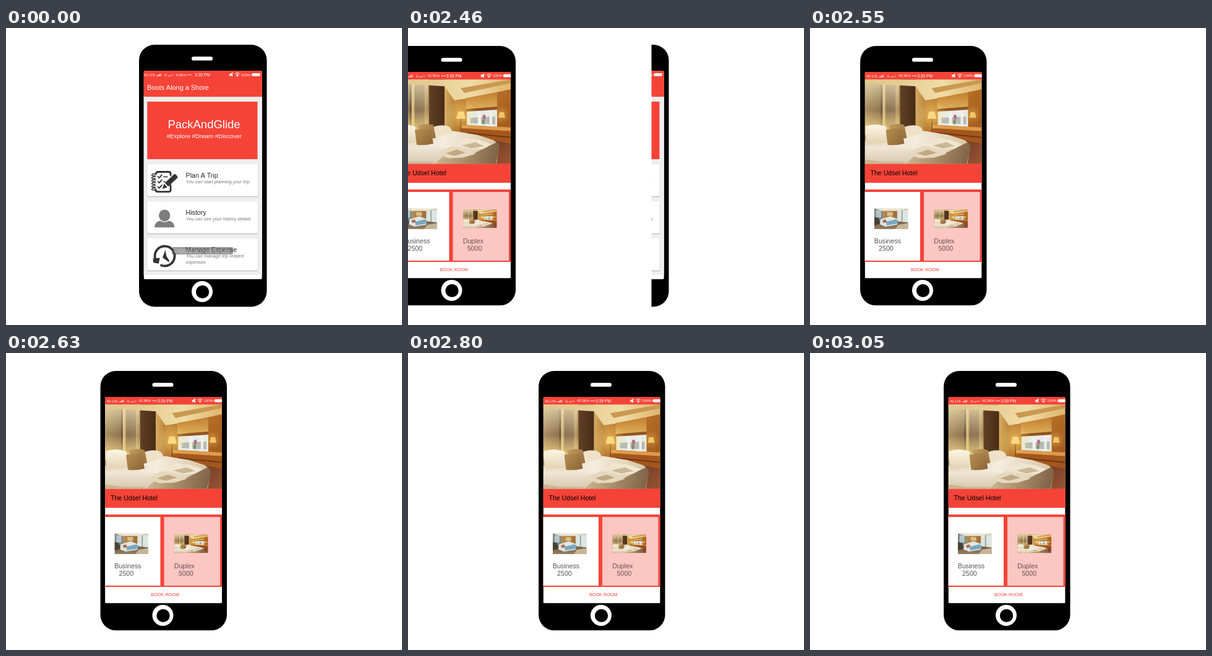
Animation, 640 px wide and 480 px high, one loop 5.05 s. Source, as an HTML page with a canvas:

```html
<!DOCTYPE html>
<html lang="en">
<head>
<meta charset="utf-8">
<title>Travel app</title>
<style>
html, body { margin: 0; width: 100%; height: 100%; overflow: hidden; background: #fff; }
canvas { display: block; width: 640px; height: 480px; }
</style>
</head>
<body>
<canvas id="stage" width="640" height="480"></canvas>
<script>
const ctx = document.getElementById('stage').getContext('2d');
const LOOP = 5050, SLIDE_START = 2380, SLIDE_STEPS = 13, SLIDE_END = 2920;
const RED = '#f64338', DARK = '#333';

function box(color, x, y, w, h, r = 0) {
  ctx.fillStyle = color;
  ctx.beginPath();
  ctx.roundRect(x, y, w, h, r);
  ctx.fill();
}

function disc(color, x, y, rx, ry = rx) {
  ctx.fillStyle = color;
  ctx.beginPath();
  ctx.ellipse(x, y, rx, ry, 0, 0, 7);
  ctx.fill();
}

function shape(color, d) {
  ctx.fillStyle = color;
  ctx.fill(new Path2D(d));
}

function line(color, width, d) {
  ctx.strokeStyle = color;
  ctx.lineWidth = width;
  ctx.stroke(new Path2D(d));
}

function text(str, x, y, size, color, align = 'left', style = '') {
  ctx.font = `${style} ${size}px "Liberation Sans", Arial, sans-serif`;
  ctx.textAlign = align;
  ctx.fillStyle = color;
  ctx.fillText(str, x, y);
}

function fade(x0, y0, x1, y1, ...colors) {
  const g = ctx.createLinearGradient(x0, y0, x1, y1);
  colors.forEach((c, i) => g.addColorStop(i / (colors.length - 1), c));
  return g;
}

function glow(x, y, r, rgb, alpha) {
  const g = ctx.createRadialGradient(x, y, 0, x, y, r);
  g.addColorStop(0, `rgba(${rgb},${alpha})`);
  g.addColorStop(1, `rgba(${rgb},0)`);
  box(g, x - r, y - r, 2 * r, 2 * r);
}

// Runs draw() in a w0 x h0 space mapped onto the given rectangle.
function framed(x, y, w, h, w0, h0, draw) {
  ctx.save();
  ctx.translate(x, y);
  ctx.scale(w / w0, h / h0);
  ctx.beginPath();
  ctx.rect(0, 0, w0, h0);
  ctx.clip();
  draw();
  ctx.restore();
}

function phone(x, y, w, h, screen, homeY, drawScreen) {
  box('#000', x, y, w, h, 25);
  box('#fff', 300, y + 19.3, 34, 6.2, 3.1);
  disc('#fff', 317, homeY, 17);
  disc('#000', 317.6, homeY + 0.5, 10.6);
  ctx.save();
  ctx.beginPath();
  ctx.roundRect(...screen, 2);
  ctx.clip();
  box('#fff', ...screen);
  drawScreen();
  ctx.restore();
}

function signal(x, y, solid, unit) {
  for (let i = 0; i < 5; i++) {
    const h = (i + 1.4) * unit;
    box(i < solid ? '#fff' : 'rgba(255,255,255,.35)', x + i * 1.9, y - h, 1.1, h);
  }
}

function statusBar(dx, dy, speed, dotsX, clock) {
  ctx.save();
  ctx.translate(dx, dy);
  text('4G LTE', 222.8, 78, 5.4, '#fff');
  signal(243, 78, 4, 0.9);
  text('G', 256.2, 78, 5.4, '#fff');
  signal(262, 78, 2, 0.75);
  text(speed, 274.8, 77.6, 5.9, '#fff');
  for (let i = 0; i < 3; i++) disc('#fff', dotsX + i * 2.5, 75.6, 0.8);
  text(clock, 305, 77.8, 6.7, '#fff');
  shape('#fff', 'M361 74H363L366 71.8V78.6L363 76.8H361Z');
  line('#fff', 0.8, 'M361.6 78.4L367 72');
  line('#fff', 1, 'M369.8 74.3Q374 70.8 378.2 74.3M371.4 76Q374 73.8 376.6 76');
  disc('#fff', 374, 77.3, 1.2);
  text('100%', 380, 77.6, 5.9, '#fff');
  box('#fff', 397.6, 73, 13, 4.8, 1);
  box('#fff', 396.6, 74.5, 1.2, 1.8);
  ctx.restore();
}

function notebookIcon() {
  ctx.lineJoin = ctx.lineCap = 'round';
  line(DARK, 2.8, 'M242.5 236Q242.5 232.5 246 232.5H263Q266 232.5 266 235.5V238M266 254V262Q266 264.7 263 264.7H245.5Q242 264.7 242 261.5');
  for (let i = 0; i < 6; i++) {
    const y = 237 + i * 4.6;
    line(DARK, 1.5, `M241.8 ${y - 1}Q236 ${y - 2} 235.5 ${y + 1}Q237 ${y + 2.4} 241 ${y + 1.6}`);
  }
  for (const y of [240, 248, 256.5]) line(DARK, 1.8, `M245.5 ${y}L247.6 ${y + 2.4}L251.8 ${y - 2.6}`);
  line(DARK, 1.3, 'M254.5 240.5H261M254.5 248.5H257');
  shape(DARK, 'M271.5 236.5Q273 235.4 274.4 236.8L277 239.8Q278 241.2 276.8 242.4L262.2 256.3L256.8 250.2ZM255.6 251.6L260.8 257.5L252.8 259.9Z');
  ctx.lineJoin = 'miter';
  ctx.lineCap = 'butt';
}

function personIcon() {
  disc('#7d7d7d', 256.2, 303, 9.2, 9.4);
  shape('#7d7d7d', 'M240 322.3Q240 313.5 249 311.5Q256 316 263.5 311.5Q272.3 313.5 272.3 322.3Z');
}

function clockIcon() {
  line(DARK, 3.8, 'M241.2 373A16 16 0 1 1 249.5 382.9');
  shape(DARK, 'M237.4 372.5L248.6 371.5L246.8 380.8L238.2 379.2Z');
  shape(DARK, 'M257.6 358.5L259.2 368.5L264.4 376.8L262.8 378L253 371Z');
}

function card(y, title, notes, icon) {
  box('#dedede', 227.5, y + 0.7, 180, 52.4, 1.5);
  box('#c4c4c4', 228.2, y + 1, 178.6, 51.4, 1.5);
  box('#fff', 228.2, y, 178.6, 51.3, 1.5);
  icon();
  text(title, 290.6, y + 21.7, 10.6, '#222');
  notes.forEach((note, i) => text(note, 291, y + 30.8 + i * 9.4, 7.45, '#777', 'left', 'italic'));
}

function homeScreen() {
  box(RED, 222, 69, 193, 42);
  box('#eee', 222, 111, 193, 288);
  box('#dcdcdc', 222, 111, 193, 1);
  statusBar(0, 0, '0.6K/s', 294, '3:30 PM');
  text('Boots Along a Shore', 228, 100, 10.9, '#fff');
  box(RED, 228.3, 119, 178.2, 93);
  text('PackAndGlide', 320, 161.8, 18.5, '#fff', 'center');
  text('#Explore #Dream #Discover', 320.2, 177.8, 9.72, '#fff', 'center');
  card(220.5, 'Plan A Trip', ['You can start planning your trip'], notebookIcon);
  card(280.5, 'History', ['You can see your history details'], personIcon);
  card(340.5, 'Manage Expense', ['You can manage trip related', 'expenses'], clockIcon);
  box('rgba(85,85,85,.58)', 268, 354, 99, 12, 2);
  text('Logged in Successfully', 271.5, 363.2, 8.9, 'rgba(225,225,225,.55)');
}

function bedroom() {
  box('#a9844f', 0, 0, 189, 137);
  // panelled wall with hidden lighting
  const panels = [[0, 26, '#ab9064', '#8d7350'], [26, 3, '#6a5035', '#6a5035'], [29, 5, '#e6d29c', '#b89758'],
    [34, 16, '#8b7453', '#94795a'], [50, 7, '#bfa272', '#a58351'], [57, 25, '#5f4126', '#4a2c17'],
    [82, 17, '#d6ad62', '#b67f38']];
  for (const [x, w, left, right] of panels) box(fade(x, 0, x + w, 0, left, right), x, 0, w + 0.5, 100);
  box(fade(0, 0, 0, 48, 'rgba(255,240,195,.7)', 'rgba(255,240,195,0)'), 0, 0, 56, 48);
  box(fade(0, 50, 0, 82, 'rgba(255,226,140,0)', 'rgba(255,226,140,.75)'), 0, 50, 57, 40);
  // ceiling
  shape(fade(0, 0, 189, 10, '#e2c78c', '#e6cc93', '#f0dca6', '#e0b56c'), 'M0 0H189V17L118 31L98 34L82 11L0 6Z');
  shape('#c99950', 'M108 14L189 0V6L114 22Z');
  // wooden wall and window
  shape(fade(100, 30, 189, 100, '#c58a3e', '#b26a25', '#a0551b'), 'M98 34L118 31L189 16V125H98Z');
  shape(fade(0, 24, 0, 48, '#c48435', '#dfae5c'), 'M117 30L167 21V45L117 49Z');
  shape('#8f5420', 'M117 48L167 44V50L117 52Z');
  shape('#e8ebe8', 'M118 52L167 49V77L118 74Z');
  shape('#b3bbb4', 'M124 62L164 60V73L124 71Z');
  shape('#f3f1e8', 'M136 52H141V74H136ZM155 51H159V75H155Z');
  disc('#b9688a', 146, 61, 2.5, 4);
  disc('#7d8f5a', 145, 69, 2, 4);
  shape('#dc9b4a', 'M108 74L189 78V84L108 79Z');
  shape('#a4571d', 'M108 79L189 84V106L108 92Z');
  shape('#6f3712', 'M118 86L189 93V95L118 88Z');
  // lamps
  shape('#f6d684', 'M104 52H113L116 64H101Z');
  box('#80501f', 107.5, 64, 2, 20);
  shape('#edbd62', 'M171 53H178L180 62H169Z');
  glow(109, 58, 26, '255,222,120', 0.55);
  glow(174, 57, 15, '255,215,110', 0.35);
  // floor
  shape(fade(150, 100, 189, 137, '#6b3b22', '#9b5435'), 'M140 95L189 104V137H130Z');
  // bed
  shape(fade(0, 85, 165, 120, '#e6dac4', '#f4ecdd', '#d8c4a2'), 'M0 100L62 88L98 84L135 90L160 98Q172 104 170 114L166 137H0Z');
  shape(fade(70, 112, 165, 137, '#cdb894', '#a78c68', '#7f6247'), 'M62 137L96 112L130 120L166 102Q173 106 170 116L165 137Z');
  shape(fade(0, 108, 0, 137, '#f1e8d8', '#d8c9ae'), 'M0 108L52 110L94 112L66 137H0Z');
  shape('#c9b592', 'M0 130L30 134L66 134L64 137H0Z');
  shape(fade(0, 75, 0, 104, '#fbf4e2', '#e3d3b4'), 'M1 76Q18 70 35 77L37 102Q18 106 2 103Z');
  shape('#efe2c8', 'M62 78Q80 71 91 78L96 87L66 95Z');
  shape(fade(37, 74, 67, 95, '#c49d60', '#95703f'), 'M38 75Q52 70 64 74L68 95L50 98Z');
  shape(fade(35, 82, 62, 105, '#b58d52', '#8c6636'), 'M34 82Q48 78 60 82L64 104Q50 108 37 106Z');
  // folded robes
  shape('#efe5d1', 'M96 104L116 95L138 98L158 105L146 112L124 114Z');
  shape('#cbb894', 'M110 107L132 102L146 108L126 112Z');
  shape('#e5d8be', 'M68 120L94 108L122 114L132 121L112 127L88 128Z');
  shape('#bfa982', 'M84 120L102 114L116 119L98 124Z');
}

function blueRoom() {
  box('#cdc9b8', 0, 0, 55, 34);
  box('#7d8b8b', 0, 0, 14, 22);
  box('#b4c5c8', 3, 3, 8, 12);
  box(fade(14, 0, 38, 0, '#b78a50', '#a26c35'), 14, 4, 23, 13);
  box('#dcbd85', 21, 6, 9, 6);
  box('#dde5e2', 38, 3, 17, 20);
  box('#9aa89a', 44, 3, 2, 20);
  shape('#ece5d0', 'M0 0H55L38 4H12Z');
  shape(fade(0, 20, 0, 34, '#6d5a45', '#97805f'), 'M0 22L18 19L55 23V34H0Z');
  shape('#4b4034', 'M0 14L7 16L10 25L0 28Z');
  shape('#dfe5e5', 'M10 18L26 13L39 18L37 27L18 30L9 26Z');
  shape('#78a8c0', 'M19 22L35 18L39 20L37 25L20 28Z');
  shape('#b0684a', 'M13 20L18 18L21 22L15 24Z');
  shape('#c5b596', 'M39 27L55 24V34H34Z');
}

function hotelScreen() {
  box(RED, 223, 71, 190, 12.4);
  statusBar(3.2, 1.8, '42.5K/s', 298, '3:39 PM');
  box(RED, 223, 219, 190, 31.2);
  framed(223.5, 83.2, 189, 136.3, 189, 137, bedroom);
  text('The Udsel Hotel', 232.5, 238.4, 10.6, '#000');
  box(RED, 223, 261, 190, 117);
  box('#fff', 223, 265, 90, 111);
  box('#fcc6c2', 319, 265, 90.5, 111);
  framed(239, 291.6, 54.6, 33.4, 55, 34, blueRoom);
  framed(335.4, 293.2, 54.6, 30, 189, 137, bedroom);
  text('Business', 238.8, 348, 10.7, '#555');
  text('2500', 246, 360, 10.7, '#555');
  text('Duplex', 335.2, 348, 10.7, '#655');
  text('5000', 342.4, 360, 10.7, '#655');
  text('BOOK ROOM', 320.7, 392.7, 7.25, RED, 'center');
}

// Distance the second page still has to travel; advances in steps at 24 per second.
function distanceLeft(t) {
  if (t < SLIDE_START) return 640;
  if (t >= SLIDE_END) return 0;
  let k = 0;
  while (k < SLIDE_STEPS - 1 && t >= SLIDE_START + 10 * Math.round(4.2 * (k + 1))) k++;
  return (7.41 - 0.57 * k - 0.08 * Math.max(0, 1 - k / 2)) ** 3;
}

function draw(now) {
  const left = distanceLeft(now % LOOP);
  box('#fff', 0, 0, 640, 480);
  if (left > 0) phone(215, 27, 206.5, 423.5, [222.6, 69.2, 191.2, 336.8], 426, homeScreen);
  if (left < 640) {
    ctx.save();
    ctx.translate(-left, 0);
    box('#fff', 0, 0, 640, 480);
    phone(216.1, 29, 204.4, 419.3, [223.6, 71, 189, 333.6], 424, hotelScreen);
    ctx.restore();
  }
}

const start = performance.now();
function tick() {
  draw(performance.now() - start);
  requestAnimationFrame(tick);
}
tick();
</script>
</body>
</html>
```
